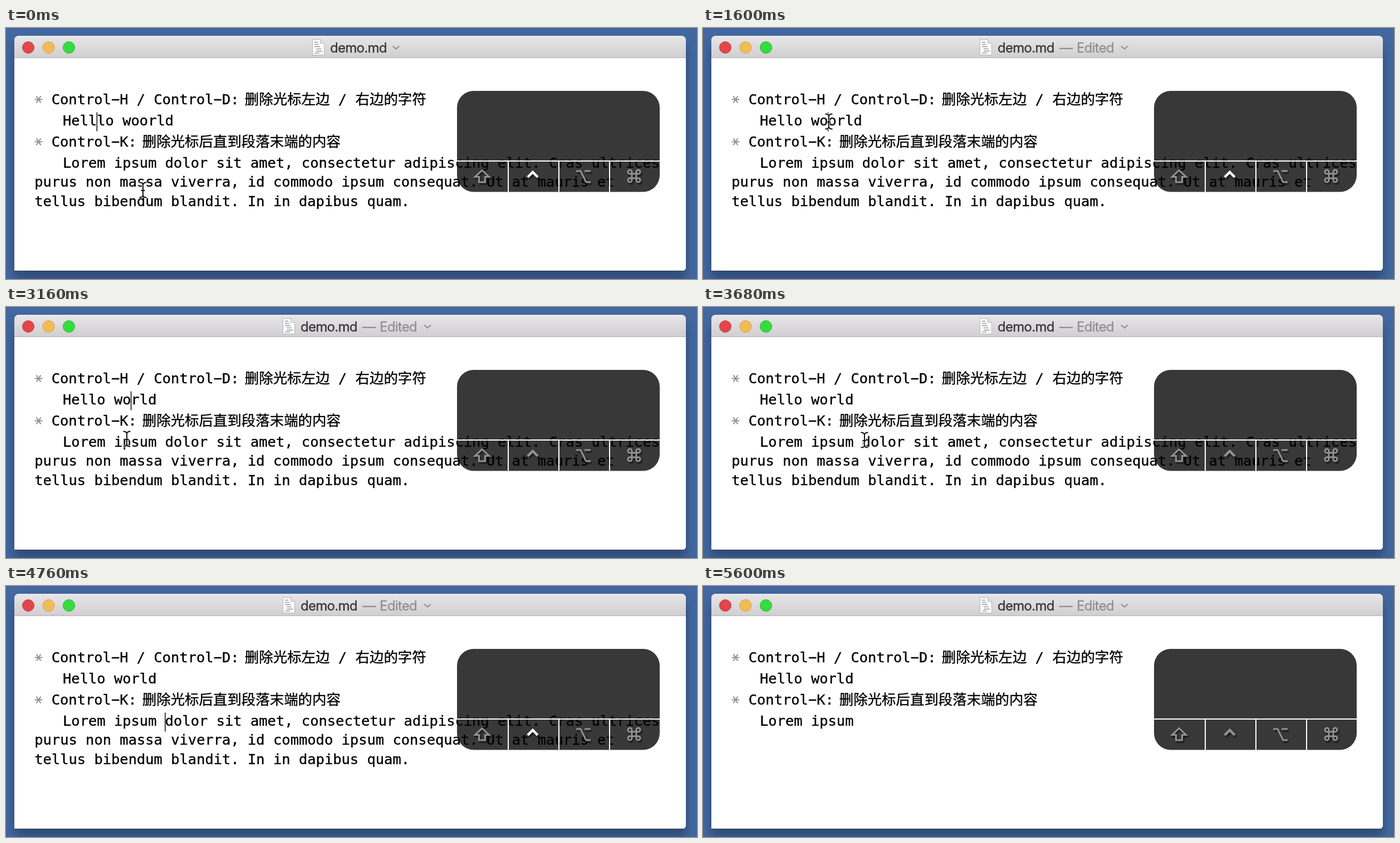
Recreate the animation shown at these times as an HTML page. Size 1241 by 451 pixels, loop 5.64 s.

```html
<!DOCTYPE html>
<html lang="zh-CN">
<head>
<meta charset="utf-8">
<style>
html, body { margin: 0; width: 100%; height: 100%; overflow: hidden; background: #41659c; }
svg { display: block; }
.doc text { font: 25.45px 'DejaVu Sans Mono', 'Noto Sans CJK SC', 'Noto Sans CJK', monospace; white-space: pre; stroke: #000; stroke-width: .35px; }
.title text { font: 24px Inter, Roboto, sans-serif; letter-spacing: -.7px; fill: #333; stroke: #333; stroke-width: .3px; }
.title .dim { fill: #8f8d8f; stroke: #8f8d8f; }
.keys path { fill: none; stroke: #929292; stroke-width: 3; filter: drop-shadow(2px 3px 1px #0009); }
</style>
</head>
<body>
<svg width="1241" height="451" viewBox="0 0 1241 451">
  <defs>
    <linearGradient id="bar" x2="0" y2="1">
      <stop stop-color="#e8e6e8"/><stop offset="1" stop-color="#d0ced0"/>
    </linearGradient>
    <filter id="soft" x="-5%" y="-10%" width="110%" height="120%"><feGaussianBlur stdDeviation="9"/></filter>
    <path id="beam" d="M-6.5-13.5C-3-13.5 0-12 0-9C0-12 3-13.5 6.5-13.5M0-9V9M-6.5 13.5C-3 13.5 0 12 0 9C0 12 3 13.5 6.5 13.5M-3.5 1H3.5"/>
    <path id="star" d="M-7 0H7M-4-6L4 6M4-6L-4 6" stroke="#8d9599" stroke-width="2.2"/>
  </defs>
  <rect width="1241" height="451" fill="#43689f"/>
  <rect x="14" y="30" width="1208" height="422" rx="8" fill="#1b2f52" opacity=".5" filter="url(#soft)"/>
  <path d="M15 436H1219" stroke="#2c3a50" stroke-width="2"/>
  <path d="M15 436V22a8 8 0 0 1 8-8H1213a8 8 0 0 1 8 8V432l-3 4z" fill="#fff"/>
  <path d="M15 54V22a8 8 0 0 1 8-8H1213a8 8 0 0 1 8 8V54z" fill="url(#bar)"/>
  <path d="M22 15H1214" stroke="#f4f3f4"/>
  <path d="M15 53.5H1221" stroke="#b3b1b3"/>
  <circle cx="40" cy="35" r="10.5" fill="#e0464b" stroke="#cf3d41"/>
  <circle cx="76.5" cy="35" r="10.5" fill="#efbd58" stroke="#d9a13d"/>
  <circle cx="113" cy="35" r="10.5" fill="#33dc3f" stroke="#2bb834"/>

  <g class="title">
    <g id="name">
      <path d="M.5 20.5H14.5L21.5 27.5V48.5H.5z" fill="#fff" stroke="#b4b4b4"/>
      <path d="M14.5 20.5V27.5H21.5" fill="#e4e4e4" stroke="#b4b4b4"/>
      <path d="M4 25.5h6M4 33.5h10M7 41.5h11" stroke="#909090" stroke-width="1.6"/>
      <path d="M4 29.5h8M7 37.5h9M4 45h9" stroke="#7fa98e" stroke-width="1.6"/>
      <text x="32" y="44">demo.md</text>
    </g>
    <g id="edited"><text class="dim" x="640" y="44">—</text><text class="dim" x="671" y="44">Edited</text></g>
    <path id="chevron" d="M-6 32.5L0 37.5L6 32.5" fill="none" stroke="#949294" stroke-width="2.2"/>
  </g>

  <g class="doc">
    <use href="#star" x="58.5" y="128.5"/>
    <use href="#star" x="58.5" y="204.5"/>
    <text x="81.7" y="136.5">Control−H / Control−D:</text>
    <text x="428.8" y="136.5">删除光标左边</text>
    <text x="581.5" y="136.5"> / </text>
    <text x="627.5" y="136.5">右边的字符</text>
    <text id="hello" x="102" y="174.5"></text>
    <text x="81.7" y="212.7">Control−K:</text>
    <text x="244.8" y="212.7">删除光标后直到段落末端的内容</text>
    <text x="102" y="250.5">Lorem ipsum</text>
    <g id="rest">
      <text x="285.8" y="250.5">dolor sit amet, consectetur adipiscing elit. Cras ultrices</text>
      <text x="51.2" y="285">purus non massa viverra, id commodo ipsum consequat. Ut at mauris et</text>
      <text x="51.2" y="319.7">tellus bibendum blandit. In in dapibus quam.</text>
    </g>
    <rect id="caret" width="1.7" height="34" fill="#222"/>
  </g>

  <g id="pointer" fill="none">
    <use href="#beam" stroke="#fff" stroke-width="4"/>
    <use href="#beam" stroke="#111" stroke-width="2"/>
  </g>

  <g class="keys">
    <rect x="810" y="113" width="364" height="181.5" rx="30" fill="#000" fill-opacity=".78"/>
    <g fill="#fff">
      <rect x="810" y="238" width="364" height="2"/>
      <rect x="901" y="239" width="2" height="55.5"/>
      <rect x="992" y="239" width="2" height="55.5"/>
      <rect x="1083" y="239" width="2" height="55.5"/>
    </g>
    <path d="M855 255.5L867.5 267.5H860.5V277H849.5V267.5H842.5z"/>
    <path id="ctrl" d="M937 268L946 259L955 268" style="stroke-width:4.5"/>
    <path d="M1024 257H1032L1042 277H1050M1039 257H1050"/>
    <path d="M1124 262H1132V270H1124zM1124 262H1121a3.5 3.5 0 1 1 3-3.5zM1132 262V258.5a3.5 3.5 0 1 1 3.5 3.5zM1132 270H1135.5a3.5 3.5 0 1 1-3.5 3.5zM1124 270V273.5a3.5 3.5 0 1 1-3.5-3.5z"/>
  </g>
</svg>
<script>
const LOOP = 5640, STEP = 40, BLINK = 520, CHAR = 15.32;
const $ = id => document.getElementById(id);
const show = (id, on) => $(id).style.display = on ? '' : 'none';
const within = (t, spans) => spans.some(([a, b]) => t >= a && t < b);

// Caret resets: time, column, top
const carets = [[0, 4, 151.5], [440, 3, 151.5], [1320, 8, 151.5], [1760, 8, 151.5], [3720, 12, 227.5], [4920, 12, 227.5]];
// Pointer stops: time, x, y
const stops = [[0, 246, 291], [700, 246, 291], [920, 259, 236], [1240, 226, 168], [1960, 226, 168],
  [2240, 317, 356], [2680, 317, 356], [3160, 217, 237], [3640, 290, 239], [LOOP, 290, 239]];
const pointerShown = [[0, 440], [720, 1760], [2000, 4600]];
const ctrlHeld = [[0, 560], [1560, 1960], [4520, 5200]];

function pointerAt(t) {
  const i = stops.findIndex(s => s[0] > t);
  const [t0, x0, y0] = stops[i - 1], [t1, x1, y1] = stops[i];
  const p = (t - t0) / (t1 - t0), e = p * p * (3 - 2 * p);
  return [x0 + (x1 - x0) * e, y0 + (y1 - y0) * e];
}

function draw(t) {
  const edited = t >= 440;
  $('name').setAttribute('transform', `translate(${edited ? 497 : 550} 0)`);
  $('chevron').setAttribute('transform', `translate(${edited ? 757 : 700.5} 0)`);
  show('edited', edited);
  $('hello').textContent = t < 440 ? 'Helllo woorld' : t < 1760 ? 'Hello woorld' : 'Hello world';
  show('rest', t < 4920);

  const [reset, col, top] = carets.filter(c => c[0] <= t).pop();
  $('caret').setAttribute('x', 101.2 + col * CHAR);
  $('caret').setAttribute('y', top);
  show('caret', Math.floor((t - reset) / BLINK) % 2 === 0);

  $('pointer').setAttribute('transform', `translate(${pointerAt(t)})`);
  show('pointer', within(t, pointerShown));
  $('ctrl').style.stroke = within(t, ctrlHeld) ? '#fff' : '';
}

function tick() {
  draw(Math.floor(performance.now() % LOOP / STEP) * STEP);
  requestAnimationFrame(tick);
}
tick();
</script>
</body>
</html>
```
